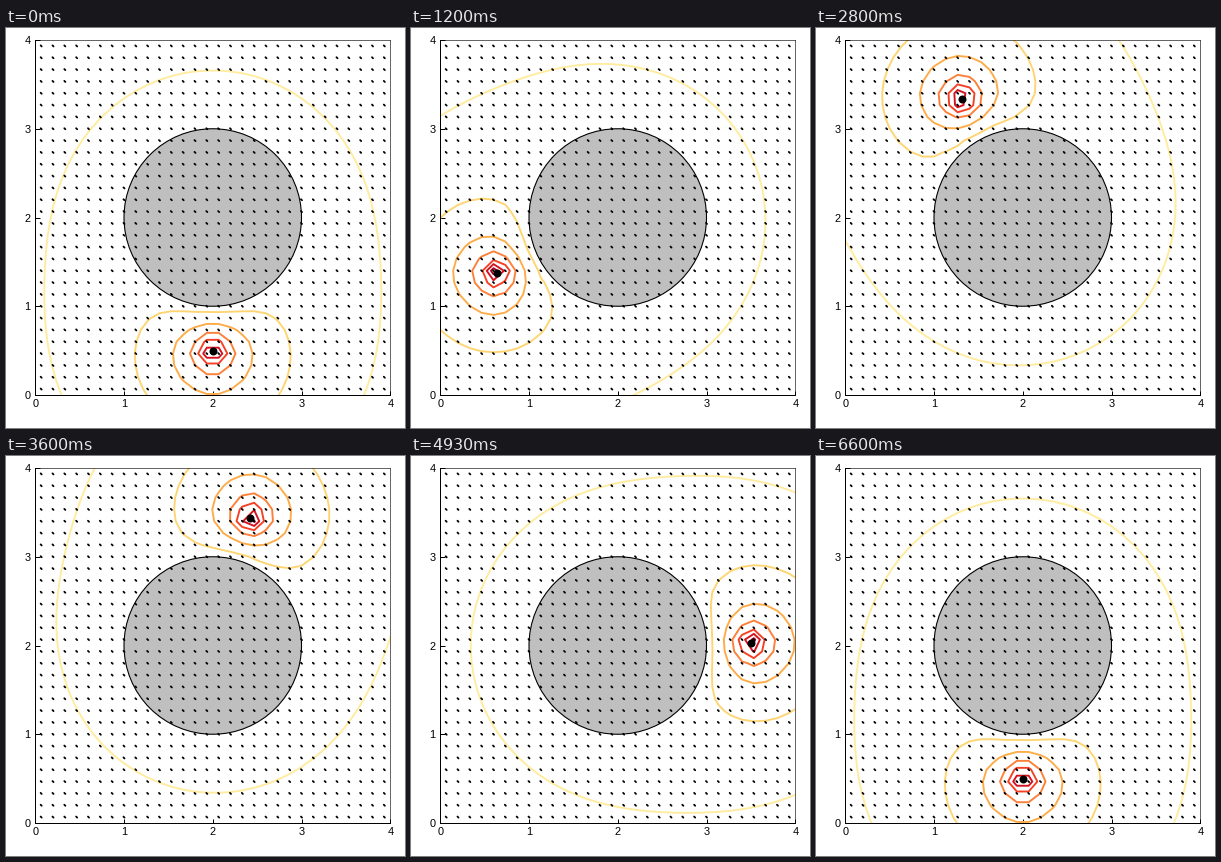
A matplotlib script for the animation above (6.67 s loop, 399 px wide and 400 px high).

```python
import numpy as np
import matplotlib.pyplot as plt
from matplotlib.animation import FuncAnimation
from matplotlib.collections import LineCollection
from matplotlib.colors import LinearSegmentedColormap

W, H, DPI = 399, 400, 100
PX = 72 / DPI
TICK, TICKS = 10, 667       # clock step in ms, steps per loop
POSES, FPS = 100, 15
CELLS, SIZE = 30, 4.0
DX = SIZE / CELLS
CENTER, RADIUS, ORBIT = 2.0, 1.0, 1.5

plt.rcParams["font.family"] = "Liberation Sans"


def m4prime(r):
    r = np.abs(r)
    near = 1 - 2.5 * r**2 + 1.5 * r**3
    far = 0.5 * (2 - r) ** 2 * (1 - r)
    return np.where(r < 1, near, np.where(r < 2, far, 0))


def smooth3(r):
    """Smoothed three-point delta kernel."""
    r = np.abs(r)
    q, c = np.sqrt(3), np.sqrt(3) * np.pi / 108
    a, b = np.clip(r, 0, 1), np.clip(r, 1, 2)
    near = (17 / 48 + c + a / 4 - a**2 / 4
            + (1 - 2 * a) / 16 * np.sqrt(1 + 12 * a - 12 * a**2)
            - q / 12 * np.arcsin(q / 2 * (2 * a - 1)))
    far = (55 / 48 - c - 13 * b / 12 + b**2 / 4
           + (2 * b - 3) / 48 * np.sqrt(36 * b - 12 * b**2 - 23)
           + q / 36 * np.arcsin(q / 2 * (2 * b - 3)))
    return np.where(r < 1, near, np.where(r < 2, far, 0))


def lattice_green(n, samples=2000):
    """2D lattice Green's function, scaled to behave like -log(r)."""
    k = (np.arange(samples) + 0.5) * np.pi / samples
    s = np.arccosh(2 - np.cos(k))
    i = np.arange(n)[:, None]
    decay = np.exp(-i * s) / np.sinh(s)
    g = (np.sum(1 / np.sinh(s)) - decay @ np.cos(i * k).T) * np.pi / samples
    return np.euler_gamma + 1.5 * np.log(2) - np.log(DX) - g


# Nodes sit at cell centres, with two extra layers around the plot
idx = np.arange(-2, CELLS + 2)
nodes = (idx + 0.5) * DX
gx, gy = (g.ravel() for g in np.meshgrid(idx, idx))
green = lattice_green(len(idx))[abs(gx[:, None] - gx), abs(gy[:, None] - gy)]


def spread(x, y, kernel):
    """Weights that spread points onto the grid, one row per point."""
    wx = kernel((x[:, None] - nodes) / DX)
    wy = kernel((y[:, None] - nodes) / DX)
    return (wy[:, :, None] * wx[:, None, :]).reshape(len(x), -1)


# Vortex circling the cylinder clockwise, starting at the bottom
turn = 2 * np.pi * np.arange(POSES) / (POSES - 1)
vx = CENTER - ORBIT * np.sin(turn)
vy = CENTER - ORBIT * np.cos(turn)

# Bound vorticity on the cylinder: constant stream function, no net circulation
count = int(2 * np.pi * RADIUS / (1.4 * DX))
theta = 2 * np.pi * np.arange(count) / count
body = spread(CENTER + RADIUS * np.cos(theta), CENTER + RADIUS * np.sin(theta), smooth3)
free = spread(vx, vy, m4prime) @ green
one = np.ones((count, 1))
system = np.block([[body @ green @ body.T, one], [one.T, np.zeros((1, 1))]])
rhs = np.vstack([-body @ free.T, np.zeros((1, POSES))])
bound = np.linalg.solve(system, rhs)[:count]
stream = (free + bound.T @ body @ green).reshape(POSES, len(idx), len(idx))

cmap = LinearSegmentedColormap.from_list("heat", [
    "#ffffcc", "#ffeda0", "#fed976", "#feb24c", "#fd8d3c",
    "#fc4e2a", "#e31a1c", "#bd0026", "#800026"])
steps = np.arange(1, 8)
levels = (steps - 2.5) * np.pi / 6
colors = cmap(steps / 7.6)

fig = plt.figure(figsize=(W / DPI, H / DPI), dpi=DPI, facecolor="white")
ax = fig.add_axes([29.25 / W, 33 / H, 355 / W, 355 / H])
ax.set(xlim=(0, SIZE), ylim=(0, SIZE), xticks=range(5), yticks=range(5))
ax.tick_params(direction="in", length=4.5 * PX, width=PX, labelsize=11 * PX)
ax.tick_params(axis="x", pad=4 * PX)
ax.tick_params(axis="y", pad=4.5 * PX)
for side, spine in ax.spines.items():
    spine.set_linewidth(PX if side in ("left", "bottom") else 0.6 * PX)

ax.add_patch(plt.Circle((CENTER, CENTER), RADIUS, fc="#bfbfbf", ec="black",
                        lw=1.1 * PX, zorder=3))

# Tiny slanted strokes, one per cell
tip = np.array([0.006, -0.006])
grid = np.stack(np.meshgrid(nodes[2:-2], nodes[2:-2]), axis=-1).reshape(-1, 2)
ax.add_collection(LineCollection(np.stack([grid - tip, grid + tip], axis=1),
                                 colors="black", linewidths=1.8 * PX,
                                 capstyle="round", zorder=4), autolim=False)

dot, = ax.plot([], [], "o", color="black", ms=8 * PX, mew=0, zorder=5)
lines, shown = None, None


def draw(n):
    global lines, shown
    pose = int((n + 0.5) * TICK * FPS / 1000)
    if pose != shown:
        if lines is not None:
            lines.remove()
        lines = ax.contour(nodes, nodes, stream[pose], levels=levels,
                           colors=colors, linewidths=1.9 * PX, zorder=2)
        dot.set_data([vx[pose]], [vy[pose]])
        shown = pose
    return lines, dot


def start():
    return draw(0)


anim = FuncAnimation(fig, draw, frames=TICKS, init_func=start,
                     interval=TICK, repeat=True, repeat_delay=0)
plt.show()
```
